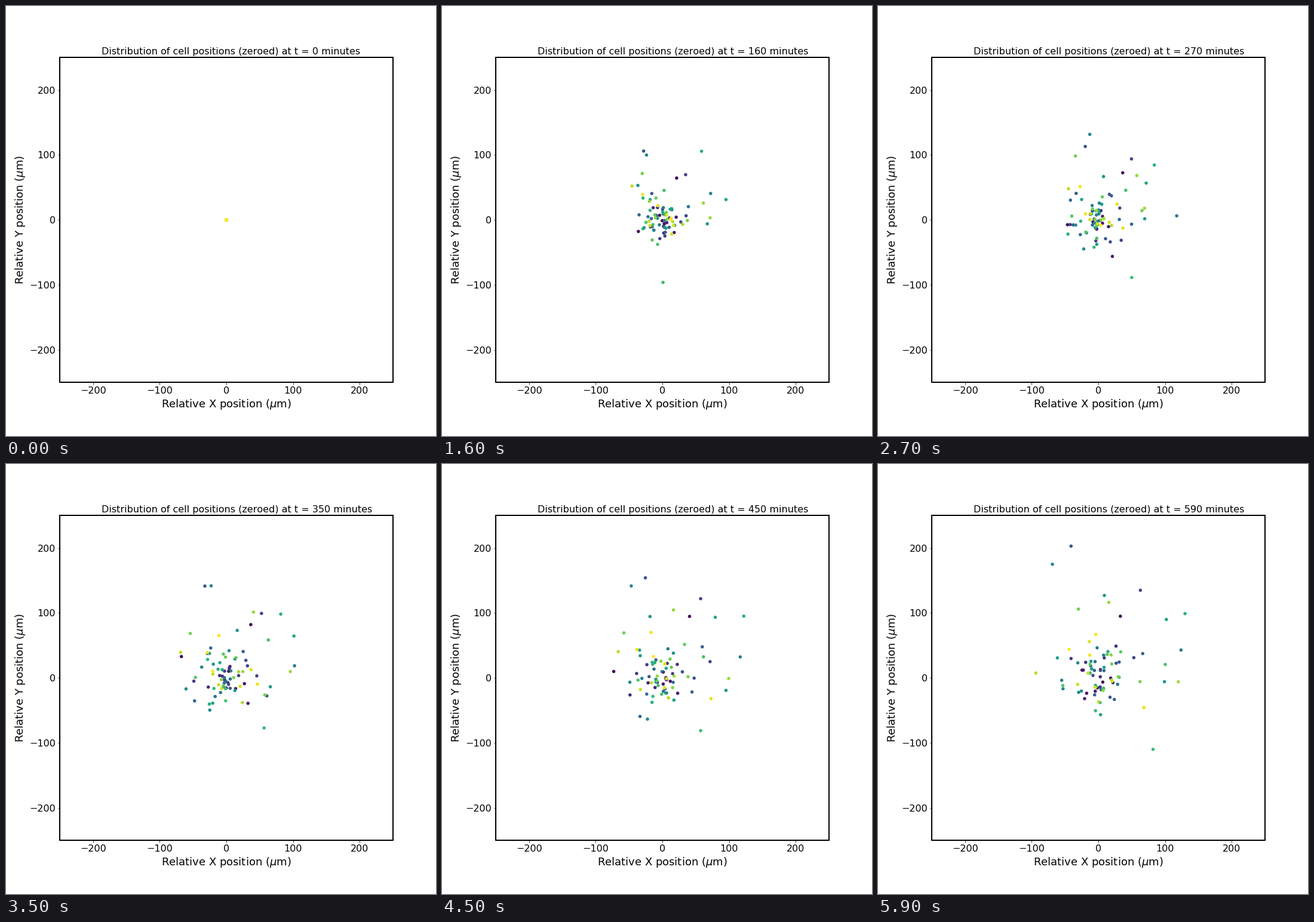
These frames come from a looping animation (720 by 720 pixels, 6 s). A matplotlib script:

```python
import numpy as np
import matplotlib.pyplot as plt
from matplotlib.animation import FuncAnimation

plt.rcParams["font.family"] = "DejaVu Sans"
plt.rcParams["text.kerning_factor"] = 6

FRAMES = 60
INTERVAL = 100
CELLS = 86
MINUTES_PER_FRAME = 10

# Where the farthest-travelling cells end, in micrometres.
FAR_ENDS = {
    2: (33, 95),
    18: (63, 135),
    22: (-41, 203),
    35: (124, 43),
    39: (-69, 175),
    44: (9, 127),
    50: (102, 90),
    54: (130, 99),
    58: (82, -110),
    67: (-30, 106),
    73: (120, -6),
    84: (-4, 67),
}


def random_walks(rng):
    """Walks from the origin with a slight pull back towards it."""
    speed = rng.uniform(2.5, 7, (CELLS, 1))
    walks = np.zeros((FRAMES, CELLS, 2))
    for i in range(1, FRAMES):
        walks[i] = 0.99 * walks[i - 1] + speed * rng.normal(size=(CELLS, 2))
    return walks


def lead_to(walk, end):
    """Add a drift, fast at first, that brings a walk to its end point."""
    ease = np.sqrt(np.linspace(0, 1, FRAMES))
    return walk + np.outer(ease, end - walk[-1])


paths = random_walks(np.random.default_rng(12))
for cell, end in FAR_ENDS.items():
    paths[:, cell] = lead_to(paths[:, cell], end)

fig = plt.figure(figsize=(10, 10), dpi=72, facecolor="white")
ax = fig.add_axes([0.125, 0.125, 0.775, 0.755])
ax.set(xlim=(-250, 250), ylim=(-250, 250))
ax.set_xticks(range(-200, 201, 100))
ax.set_yticks(range(-200, 201, 100))
ax.tick_params(labelsize=16)
ax.set_xlabel(r"Relative X position ($\mu$m)", fontsize=18)
ax.set_ylabel(r"Relative Y position ($\mu$m)", fontsize=18)
for spine in ax.spines.values():
    spine.set_linewidth(2)

dots = ax.scatter(*paths[0].T, s=16, c=np.arange(CELLS), cmap="viridis",
                  linewidths=1.5)
title = ax.text(0.125, 1.01, "", fontsize=16, transform=ax.transAxes)


def update(i):
    dots.set_offsets(paths[i])
    minutes = MINUTES_PER_FRAME * i
    title.set_text(f"Distribution of cell positions (zeroed) at t = {minutes} minutes")
    return dots, title


anim = FuncAnimation(fig, update, frames=FRAMES, interval=INTERVAL, repeat=True)
plt.show()
```
